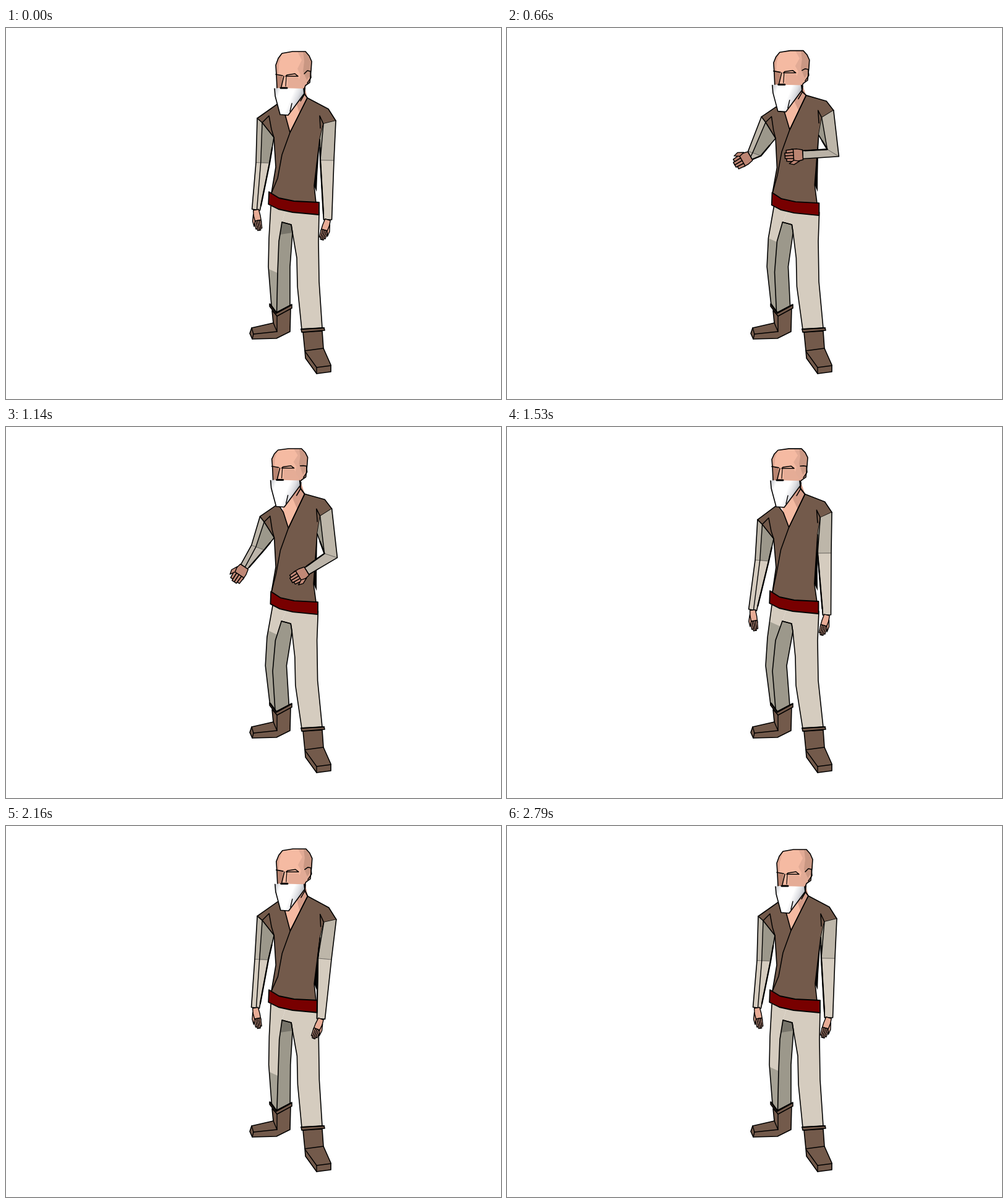
These frames come from a looping animation (800x600 px, 2.82 s). An HTML page with a canvas:

```html
<!DOCTYPE html>
<html>
<head>
<meta charset="utf-8">
<style>
html, body { margin: 0; width: 100%; height: 100%; overflow: hidden; background: #fff; }
canvas { display: block; }
</style>
</head>
<body>
<canvas id="stage" width="800" height="600"></canvas>
<script>
const ctx = document.getElementById('stage').getContext('2d');
const LOOP = 2820, END = 2790, STEP = 30;
const CLOTH = '#d5ccbf', CLOTH_MID = '#bdb6a9', CLOTH_DARK = '#9c988b';
const VEST = '#735a4b', SKIN = '#f5baa2', RED = '#780000';

// lean: body turn, raise: arm lift, look: head tilt, arms: elbow then wrist.
const POSES = [
  { t: 0, lean: 0, raise: 0, look: 0, left: [415,218, 404,294], right: [519,214, 520,310] },
  { t: 420, lean: .25, raise: .8, look: .17, left: [400,206, 399,265], right: [531,214, 479,267] },
  { t: 660, lean: .65, raise: 1, look: .47, left: [400,203, 393,207], right: [527,202, 478,205] },
  { t: 1140, lean: .8, raise: .9, look: 1, left: [407,195, 385,226], right: [525,208, 486,233] },
  { t: 1530, lean: 1, raise: 0, look: .96, left: [412,216, 397,296], right: [513,204, 517,304] },
  { t: 2160, lean: -.1, raise: 0, look: .33, left: [413,216, 403,294], right: [515,215, 509,312] }
];

const values = p => [p.lean, p.raise, p.look, ...p.left, ...p.right];
const clamp = v => Math.max(0, Math.min(1, v));
const pairs = a => Array.from({ length: a.length / 2 }, (_, i) => [a[2 * i], a[2 * i + 1]]);
const mix = (p, q, u) => [p[0] + (q[0] - p[0]) * u, p[1] + (q[1] - p[1]) * u];
const off = (p, x, y) => [p[0] + x, p[1] + y];
const unit = (p, q) => {
  const x = q[0] - p[0], y = q[1] - p[1], d = Math.hypot(x, y) || 1;
  return [x / d, y / d];
};

// Smooth cyclic interpolation between the poses.
function poseAt(t) {
  const n = POSES.length;
  const row = i => values(POSES[(i + n) % n]);
  const time = i => POSES[(i + n) % n].t + Math.floor(i / n) * END;
  const slope = (i, k) => (row(i + 1)[k] - row(i - 1)[k]) / (time(i + 1) - time(i - 1));
  let i = 0;
  while (i < n - 1 && POSES[i + 1].t <= t) i++;
  const d = time(i + 1) - time(i), u = (t - time(i)) / d, h = u * u * (3 - 2 * u);
  const next = row(i + 1);
  const v = row(i).map((a, k) => a + (next[k] - a) * h
    + d * u * (1 - u) * ((1 - u) * slope(i, k) - u * slope(i + 1, k)));
  const joints = pairs(v.slice(3));
  return { lean: v[0], raise: v[1], look: v[2], left: joints.slice(0, 2), right: joints.slice(2) };
}

function trace(pts, closed) {
  ctx.beginPath();
  pts.forEach(p => ctx.lineTo(p[0], p[1]));
  if (closed) ctx.closePath();
}
function fill(pts, color, alpha = 1) {
  trace(pts, true);
  ctx.globalAlpha = clamp(alpha);
  ctx.fillStyle = color;
  ctx.fill();
  ctx.globalAlpha = 1;
}
function line(pts, width = 1.6, closed = false) {
  trace(pts, closed);
  ctx.lineWidth = width;
  ctx.stroke();
}
function shape(pts, color, width) {
  fill(pts, color);
  line(pts, width, true);
}
function clipped(pts, paint) {
  ctx.save();
  trace(pts, true);
  ctx.clip();
  paint();
  ctx.restore();
}

function hand(wrist, dir, side, raise) {
  const bend = .3 * side * (1 - raise), c = Math.cos(bend), s = Math.sin(bend);
  const [x, y] = [dir[0] * c - dir[1] * s, dir[0] * s + dir[1] * c];
  const size = 35 - 5 * raise, width = 11 + 9 * raise;
  const at = (u, v) => [wrist[0] + x * u * size - y * v * width, wrist[1] + y * u * size + x * v * width];
  const tone = `rgb(${232 - 44 * raise}, ${172 - 40 * raise}, ${150 - 36 * raise})`;
  shape([at(0, -.4), at(.3, -.5), at(.6, -.5), at(.6, .5), at(.3, .5), at(0, .4)], tone, 1.4);
  for (let i = 0; i < 4; i++) {
    const v = i / 4 - .5, tip = 1 - .08 * Math.abs(i - 1.5);
    shape([at(.5, v), at(tip, v * .9), at(tip, v * .9 + .22), at(.5, v + .25)], tone, 1.5);
  }
  shape([at(.2, -.5 * side), at(.5, -.75 * side), at(.75, -.65 * side), at(.5, -.4 * side)], tone, 1.4);
}

// side is 1 for the arm on the right of the stage, fold places the sleeve crease.
function arm(outer, inner, pit, [elbow, wrist], side, fold, raise) {
  const flow = unit(mix(outer, inner, .5), wrist), fore = unit(elbow, wrist);
  const across = (p, d, w) => off(p, d[1] * w * side, -d[0] * w * side);
  const a = across(elbow, flow, 11), b = across(elbow, flow, -11);
  const d = across(wrist, fore, 6.5), e = across(wrist, fore, -6.5);
  const f = mix(a, b, fold), g = mix(d, e, .4 + .6 * fold);
  fill([outer, a, f, inner], CLOTH_MID);
  fill([inner, f, b, pit], CLOTH_DARK);
  fill([a, d, e, b], CLOTH);
  fill([a, d, e, b], '#000', .13 * raise);
  line([outer, a, d, e, b, pit]);
  line([inner, f, g], 1.4);
  line([b, a], .5);
  line([mix(pit, b, .4), b, mix(b, e, .9)], 2.3);
  hand(wrist, fore, side, raise);
}

function boots() {
  shape([[430,457], [438,465], [460,452], [459,491], [437,502], [398,503], [394,494], [397,485], [432,477]], VEST);
  line([[432,477], [438,491], [438,465]], 1.4);
  line([[397,485], [400,495], [438,491]], 1.4);
  line([[400,495], [398,503]], 1.4);
  shape([[426,446], [437,460], [462,447], [462,453], [438,466], [426,450]], VEST, 1.5);
  line([[427,447], [437,461], [461,448]], 2.4);
  shape([[480,492], [511,490], [513,518], [525,545], [525,556], [502,559], [484,534], [483,522]], VEST);
  line([[483,522], [513,518]], 1.4);
  line([[484,524], [502,549], [525,546]], 1.4);
  line([[502,549], [502,559]], 1.4);
  shape([[477,487], [514,485], [515,489], [478,492]], VEST, 1.6);
  line([[477,487], [514,485]], 2.2);
}

function legs({ lean, raise }) {
  const x = 425 + 3.5 * raise, k = -lean;
  const crotch = [446 + k, 314], fork = [[461 + k, 318], [463 + k, 331]];
  const front = [[437.5 + 3 * k, 461], [439 + 10 * k, 395], [441 + 7 * k, 345], crotch];
  const outside = [[x + 3, 288], [425 + 4 * k, 340], [424 + 6 * k, 386], [429 + 3 * k, 449]];
  const back = [[459 + 7 * k, 386], [459 + 2 * k, 451]];
  const seat = [x + 29, 288];
  const side = [...outside, ...front, seat];
  const right = [
    [506 + 2 * k, 298], [505 + 3 * k, 345], [506 + 3 * k, 410], [511,485], [478,488],
    [471 + 4 * k, 418], [470 + 4 * k, 372], fork[1], fork[0], crotch
  ];
  const shade = 386 - 75 * lean;

  fill([...front, ...fork, ...back], CLOTH_DARK);
  fill([crotch, ...fork, [443, 334]], '#77746a', 1 - 3 * lean);
  fill(side, CLOTH);
  clipped(side, () => fill([[410, shade - 3], [445, shade + 13], [445,470], [410,470]], '#a5a194'));
  fill([seat, ...right], CLOTH);
  line([...outside, ...front, ...fork, ...back]);
  line(right);
}

// Bends the chest: lean tips the shoulder line, raise lifts both shoulders.
function chestWarp({ lean, raise }) {
  return (x, y) => {
    const h = clamp((280 - y) / 130), s = (x - 460) / 73;
    const tip = s > 0 ? -12 * s : -20 * s * (1 + s);
    return [
      x + h * (-4 * lean * (1 + s) + 8 * raise * Math.max(0, -s)),
      y + h * (lean * tip - 9 * raise * s * s)
    ];
  };
}

function torso(at, neck, lean) {
  const nape = at(440, 122), collar = at(450, 136), chest = at(487, 113);
  const vee = off(at(459, 169), 0, -7 * lean);
  const pit = at(507, 180), waist = at(498, 255), hip = at(501, 283);
  fill([off(nape, 4, -8), collar, vee, chest, neck], SKIN);
  fill([mix(vee, chest, .55), chest, neck, off(neck, -14, 24)], '#d49c88');
  line([neck, off(neck, -1, 9), chest], 2);
  line([off(neck, 0, 9), off(neck, -7, 21)], 1.5);
  shape([
    nape, at(406, 146), at(414, 153), at(433, 177), at(436, 225), [429, 267], [430, 284],
    off(hip, 0, 10), hip, waist, pit, at(513, 155), at(533, 150), at(521, 131), chest, vee, collar
  ], VEST);
  fill([pit, off(waist, 5, -15), off(hip, 1, -18), waist], '#000');
  line([at(414, 153), at(425, 142), at(429, 164), at(433, 177)], 1.5);
  line([at(513, 155), at(507, 142), at(508, 162)], 1.5);
  line([chest, vee, off(vee, -13, 36), off(vee, -20, 74), [429, 267]], 1.5);
}

function belt({ lean, raise }) {
  const x0 = 425 + 3.5 * raise, x1 = 506 - 2.5 * lean;
  const at = (u, y) => [x0 + (x1 - x0) * u, y + 1.2 * raise];
  shape([at(0, 265), at(.2, 275), at(.5, 280), at(1, 282), at(1, 302), at(.47, 298), at(.19, 293), at(-.01, 285)], RED, 1.8);
}

function head(at) {
  const many = (...list) => pairs(list).map(p => at(p[0], p[1]));
  const skull = many(438,98, 437,76, 436,60, 440,49, 446,41, 463,38, 484,38, 490,45, 494,54, 493,69, 491,88, 484,93, 481,101);
  fill(skull, SKIN);
  clipped(skull, () => {
    fill(many(470,36, 478,52, 471,66, 476,76, 470,98, 484,98, 497,60, 485,36), '#e2ab96');
    fill(many(480,36, 482,54, 480,70, 486,84, 496,72, 496,46), '#c99783');
    fill(many(446,40, 441,58, 440,74, 433,75, 433,58), '#dda590');
    fill(many(436,76, 447,78, 445,98, 436,98), '#b98470');
    fill(many(455,80, 472,80, 482,98, 455,98), '#e5ac96');
  });
  line(skull);
  line(many(436,75, 447,77), 1.7);
  line(many(452,78, 454,76, 467,74, 472,78, 453,78), 1.5);
  line(many(449,78, 445,95), 1.5);
  line(many(453,79, 452,94), 1.2);
  line(many(482,74, 487,69, 492,70, 493,80, 487,89), 1.5);

  const beard = many(440,97, 434,98, 435,110, 443,140, 456,141, 462,133, 482,106, 481,98);
  const tone = ctx.createLinearGradient(...at(434, 102), ...at(478, 120));
  tone.addColorStop(0, '#c9cbd0');
  tone.addColorStop(.18, '#ffffff');
  tone.addColorStop(.6, '#ffffff');
  tone.addColorStop(.8, '#dddee2');
  tone.addColorStop(1, '#a6a8ae');
  fill(beard, tone);
  line(beard.slice(1));
  line(many(462,122, 459,135), 1.4);
  line(many(444,97, 454,97), 3);
}

function draw(t) {
  ctx.fillStyle = '#fff';
  ctx.fillRect(0, 0, 800, 600);
  ctx.strokeStyle = '#000';
  ctx.lineJoin = ctx.lineCap = 'round';
  const pose = poseAt(t), { lean, raise, look } = pose;
  const body = chestWarp(pose);
  const face = (x, y) => {
    const u = clamp((y - 38) / 37) * (x > 482 ? .5 : 1);
    return [x - 8 * lean, y - look * (3 + 8.5 * u)];
  };
  arm(body(406, 146), body(414, 153), body(433, 177), pose.left, -1, .35, raise);
  legs(pose);
  boots();
  torso(body, face(483, 97), lean);
  belt(pose);
  arm(body(533, 150), body(513, 155), body(507, 180), pose.right, 1, 1, raise);
  head(face);
}

function frame() {
  draw(Math.floor(performance.now() % LOOP / STEP) * STEP % END);
  requestAnimationFrame(frame);
}
frame();
</script>
</body>
</html>
```
